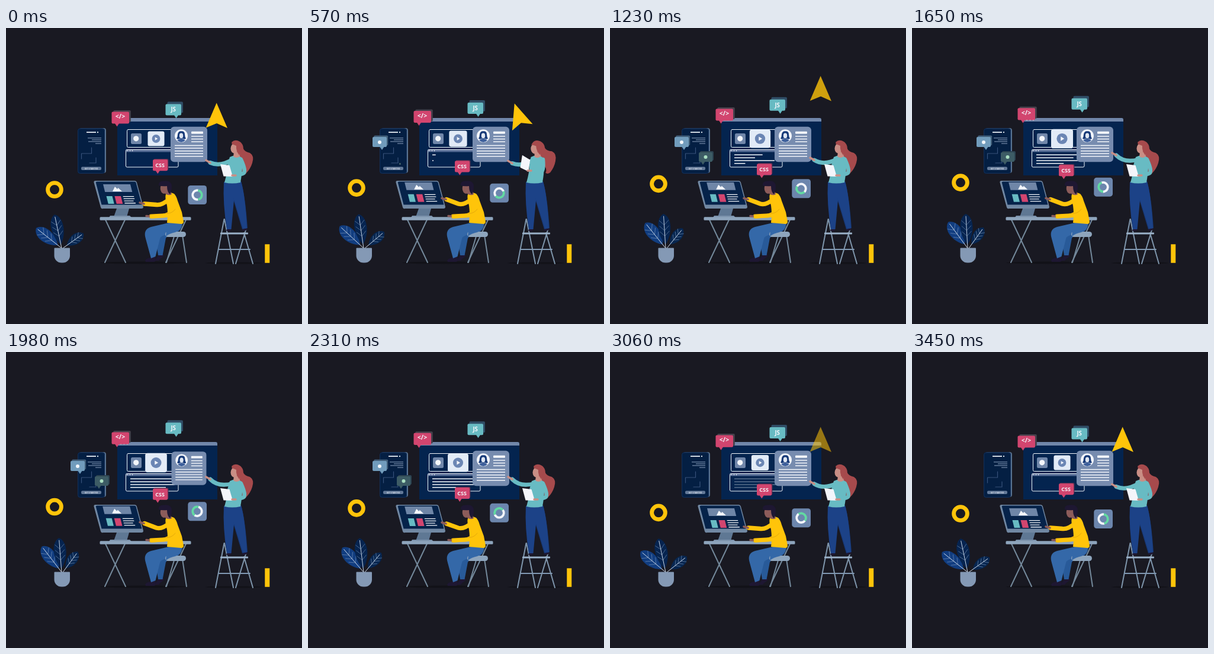
These frames come from a looping animation (500x500 px, 3510 ms). An HTML page with a canvas:

```html
<!DOCTYPE html>
<html lang="en">
<head>
<meta charset="utf-8">
<title>Web team at work</title>
<style>
html, body { margin: 0; width: 100%; height: 100%; overflow: hidden; background: #191922; }
canvas { display: block; width: 500px; height: 500px; }
</style>
</head>
<body>
<canvas id="stage" width="500" height="500"></canvas>
<script>
const ctx = document.getElementById('stage').getContext('2d');
const LOOP = 3510, CYCLE = 3480;
const C = {
  bg: '#191922', navy: '#04244f', slate: '#7187aa', steel: '#8ea5bd', leg: '#74899b',
  white: '#f3f6fb', pink: '#d2456f', teal: '#68bbc3', yellow: '#ffc40a',
  jeans: '#3468a8', pants: '#1c4287', skin: '#c98e85', brown: '#8c5c5a', hair: '#a64a4c', dark: '#1e1732'
};

const mix = (a, b, p) => a + (b - a) * p;
const ramp = (t, a, b) => {
  const p = Math.min(1, Math.max(0, (t - a) / (b - a)));
  return p * p * (3 - 2 * p);
};
const hold = (t, a, b, c, d) => ramp(t, a, b) - ramp(t, c, d);

function fill(d, color) {
  ctx.fillStyle = color;
  ctx.fill(new Path2D(d));
}
function line(d, color, width = 1) {
  ctx.strokeStyle = color;
  ctx.lineWidth = width;
  ctx.stroke(new Path2D(d));
}
function box(x, y, w, h, r, color) {
  ctx.fillStyle = color;
  ctx.beginPath();
  ctx.roundRect(x, y, w, h, r);
  ctx.fill();
}
function frame(x, y, w, h, r, color) {
  ctx.strokeStyle = color;
  ctx.lineWidth = 1;
  ctx.beginPath();
  ctx.roundRect(x, y, w, h, r);
  ctx.stroke();
}
function oval(x, y, rx, ry, color) {
  ctx.fillStyle = color;
  ctx.beginPath();
  ctx.ellipse(x, y, rx, ry, 0, 0, 7);
  ctx.fill();
}
const dot = (x, y, r, color) => oval(x, y, r, r, color);
function arc(x, y, r, from, to, color, width) {
  ctx.strokeStyle = color;
  ctx.lineWidth = width;
  ctx.beginPath();
  ctx.arc(x, y, r, from, to);
  ctx.stroke();
}
function text(s, x, y, size, color, weight = 700) {
  ctx.font = `${weight} ${size}px "Noto Sans", "Open Sans", sans-serif`;
  ctx.textAlign = 'center';
  ctx.textBaseline = 'middle';
  ctx.fillStyle = color;
  ctx.fillText(s, x, y);
}
// Runs draw() in a space moved to x,y with rotation and scale.
function at(x, y, turn, scale, draw) {
  ctx.save();
  ctx.translate(x, y);
  ctx.rotate(turn);
  ctx.scale(scale, scale);
  draw();
  ctx.restore();
}
function fade(alpha, draw) {
  if (alpha <= 0) return;
  ctx.save();
  ctx.globalAlpha = alpha;
  draw();
  ctx.restore();
}

function bubble(x, y, w, h, tail, front, back, dx, dy) {
  box(x + dx, y + dy, w, h, 2, back);
  box(x, y, w, h, 2, front);
  fill(`M${tail - 4} ${y + h - 1}h8l-4 6z`, front);
}

function browser(t, wave) {
  box(188, 152, 169, 97, [3, 3, 0, 0], C.navy);
  box(188, 152, 169, 6, [3, 3, 0, 0], C.slate);
  for (let i = 0; i < 3; i++) dot(194 + i * 5.5, 155, 1.3, C.white);

  frame(204.5, 171.5, 86.5, 30, 2, C.white);
  box(211, 178, 18, 18, 2.5, C.slate);
  dot(219.7, 186.8, 4.6, C.white);

  box(202, 205, 89, 4.5, 1, '#556b94');
  frame(202.5, 205.5, 88.5, 29.5, 2, C.white);
  for (let i = 0; i < 3; i++) dot(205.5 + i * 4, 207.4, 0.8, C.white);
  fade(1 - ramp(t, 2850, 3200), () => {
    const rows = [[480, 0.0636, 75], [700, 0.066, 75], [550, 0.1, 75], [950, 0.066, 60]];
    rows.forEach(([start, speed, max], i) => {
      const w = Math.min(max, Math.max(0, (t - start) * speed));
      if (w) box(210, 213.6 + i * 4.8, w, 1.5, 0, C.white);
    });
  });

  at(253.5, 187, 0, 1 - 0.138 * wave, () => {
    box(-16.3, -14.4, 32.6, 28.8, 3.5, '#e2ebf7');
    dot(0, 0, 8, '#6b86b4');
    fill('M-2 -3.2L3.3 0L-2 3.2z', C.white);
  });
}

function card(t) {
  at(309, 196.7, 0, 1 - 0.05 * hold(t, 1780, 1950, 2010, 2180), () => {
    box(-31, -30, 62, 59.5, 6, '#778caf');
    dot(-13, -14.5, 11, C.white);
    fill('M-21 -10Q-19 -13 -19 -17Q-18 -23 -13 -22.5Q-7 -23 -7 -17Q-7 -13 -5 -10Q-8 -8 -10 -10H-16Q-18 -8 -21 -10z', '#173a78');
    oval(-13, -14.8, 3.2, 4.4, '#dfe6f1');
    fill('M-20 -7Q-13 -13 -6 -7Q-13 -0.5 -20 -7z', '#3d5f9b');
    box(4, -22, 20, 4, 1, C.white);
    for (let i = 0; i < 3; i++) box(4, -14.5 + i * 4.6, 20, 1.5, 0, C.white);
    for (let i = 0; i < 5; i++) box(-24, 1 + i * 4.6, 48, 1.5, 0, C.white);
  });
}

function phone(t) {
  box(124, 169, 45, 76, 4, '#597391');
  box(121, 169.5, 46, 76.5, 4, '#041f43');
  frame(121.5, 170, 45, 75.5, 4, '#15305a');
  box(136, 175.3, 16, 1.7, 0, C.white);
  dot(155, 176.2, 1.1, C.white);
  [[138, 185.3], [145, 188.3], [139, 191.3], [151, 194.6]].forEach(([x, y]) => box(x, y, 161 - x, 1.1, 0, '#8296b4'));
  line('M144.5 202V212H127.5V221M152 219V228H141', '#38527b', 1.2);
  box(127, 234.5, 34, 5.5, 2, '#637998');
  text('GET STARTED', 144, 237.5, 3.5, '#ccd5e2', 600);

  const popA = hold(t, 230, 500, 2330, 2600);
  const popB = hold(t, 480, 880, 2540, 2880);
  const pop = (x, y, scale, draw) => scale > 0 && at(x, y, (scale - 1) * 1.8, scale, draw);
  pop(125, 206, popA, () => {
    bubble(-16, -22, 24, 17, 0, '#719cbc', '#405d78', 2.2, -2.5);
    dot(-4, -13, 3, C.white);
  });
  pop(157, 230, popB, () => {
    bubble(-7, -20, 23, 16, 0, '#3d5c65', '#2c4351', 2, -2);
    dot(4.5, -12, 3, '#a9dec1');
  });
}

function bubbles(wave) {
  const code = 146 + 3.1 * wave, js = 132.9 + 4.8 * wave, css = 236.5 - 4.5 * wave;
  bubble(178.5, code - 7.7, 29.5, 20.2, 187.5, C.pink, '#45404b', 2.8, -2.5);
  text('</>', 193, code + 1, 10.5, C.white);
  bubble(269.5, js - 9.3, 26.5, 19, 287.5, C.teal, '#304d66', 3, -4);
  text('JS', 282.7, js + 1, 9.8, C.white);
  bubble(248, css - 9.8, 25, 19, 256.3, C.pink, '#653252', 1.4, -1.2);
  text('CSS', 260.2, css + 0.7, 9, C.white);
}

function donut(wave, turn) {
  const y = 275.3 + 6.7 * wave;
  box(307.3, y - 16, 31.7, 32, 4.5, '#6c86ad');
  arc(323, y, 7.8, turn + 1.4, turn + 4.9, C.white, 3.8);
  arc(323, y, 7.8, turn - 1.4, turn + 1.4, '#62d9a2', 3.8);
}

function leaf(x, y, degrees, start, length, width, color) {
  at(x, y, degrees * Math.PI / 180, 1, () => {
    const span = length - start, low = -start - span * 0.35;
    fill(`M0 ${-start}C${-width} ${low} ${-width} ${-length + 6} 0 ${-length}` +
      `C${width} ${-length + 6} ${width} ${low} 0 ${-start}z`, color);
    line(`M0 0V${-length + 4}`, '#d5e0ee', 0.9);
    for (let i = 0; i < 3; i++) {
      const v = start + span * (0.28 + i * 0.18), r = width * 0.55;
      line(`M${-r} ${-v - r}L0 ${-v}L${r} ${-v - r}`, '#8fa8c8', 0.5);
    }
  });
}

function plant(phase) {
  const sway = shift => (1 - Math.cos(phase + shift)) / 2;
  leaf(94, 372, mix(-51.7, -36.5, sway(0.1)), 8, 55, 14.5, '#113d80');
  leaf(96, 372, mix(54.5, 35.5, sway(0)), 8, 43, 11.5, '#072650');
  leaf(94, 372, mix(-12.3, -3, sway(0.4)), 6, 58, 14, '#062450');
  box(81.5, 371.5, 26.5, 25, [1, 1, 12, 12], '#8499b5');
}

function desk() {
  oval(233, 396.5, 74, 2, '#121218');
  line('M168 324L202 396M201 324L167 396M304 324L270 396', C.leg, 2);
  line('M284 352L271 396M298 350L305 396', C.leg, 2);
}

function monitor(scroll) {
  fill('M187 305H208L204 319H182z', '#5f7894');
  fill('M176 317H209L212 320H174z', '#7b92ac');
  fill('M151 258H217Q220 258 221 261L232 302Q232 305 229 305H164Q161 306 160 303L148.5 261Q148 258 151 258z', '#7188a3');
  fill('M154 259.5H217Q219 259.5 219.5 261L229.5 298.5H161.5L152 262Q151 259.5 154 259.5z', '#06234a');
  ctx.save();
  ctx.transform(1, 0, 0.25, 1, 164, 264);
  ctx.translate(0, scroll);
  box(0, 0, 46, 13, 0, '#6f86a7');
  fill('M13 12L19 4L22 8L24 6L29 12z', C.white);
  box(0.5, 20, 10, 13, 0, C.teal);
  box(14.5, 20, 10.5, 13, 0, C.pink);
  for (let i = 0; i < 4; i++) box(28.5, 20 + i * 3.7, i === 2 ? 16 : 18.5, 1.3, 0, C.white);
  ctx.restore();
}

function man(reach) {
  // shoes and legs
  fill('M235 393Q236 389 244 388L252 385L253 393Q252 395 248 395H236z', C.dark);
  fill('M253 390L258 383L266 382V386Q260 390 258 393H253z', C.dark);
  fill('M297 330Q298 342 286 346Q274 349 270 355L264.5 384H257L252 352Q259 334 274 330z', '#285a99');
  fill('M275 329L298 330Q294 343 280 346Q266 349 260.5 354L252.5 386L245 389L236 356Q231 340 245 336z', C.jeans);
  box(269, 344, 35, 9, 4.5, C.steel);
  fill('M272 331H298Q296 341 286 345Q276 347 270 352z', C.jeans);
  // far forearm
  line('M283 304Q277 317 264 317L245 318', '#eeb108', 7);
  line('M246 318.5L237 317.5', C.brown, 3.5);
  // torso
  fill('M270 281Q277 276 284 280Q288 284 290 292L297 311L300 327Q300 331 296 331L272 329Q274 314 272 300Q268 286 270 281z', C.yellow);
  line('M286 303Q281 317 268 317L246 318.5', C.yellow, 6.5);
  line('M286 306Q281 313 272 313.5', '#dda20b', 0.8);
  // head
  fill('M268 274H278L280 281Q275 284 269 280z', C.brown);
  oval(267, 271, 6.3, 9, C.brown);
  fill('M258 266Q257 258 267 258.5Q280 257 280 268Q280 276 277 281Q272 277 272 267Q264 268 258 266z', C.dark);
  // reaching arm
  const y = mix(296, 288.5, reach);
  line(`M276 289Q263 300 254 ${mix(298.5, 297, reach)}L234 ${y + 1}`, C.yellow, 7.3);
  line(`M233 ${y + 1}L226 ${y - 1}`, C.brown, 3.6);
}

function ladder() {
  oval(385, 397, 49, 1.6, '#121218');
  line('M368.5 323L354 398M369 323L384 398M406 338L388 398M402 346L417 398', '#7f96ac', 2);
  line('M359 374H412', '#8199b3', 2);
  box(362, 345.5, 47, 3, 1, '#9bb2c9');
}

function woman(nod, lift) {
  const lean = -1.5 * nod;
  // hair behind the body, then legs
  at(389 + nod, 218, -0.12 * nod, 1, () => {
    fill('M-8 -25Q-2 -31 6 -26Q12 -22 12 -14Q14 -9 23 -7Q31 -2 27 10Q24 20 16 28Q11 31 8 28Q13 20 4 12Q-1 3 -1 -6z', C.hair);
  });
  fill('M372 341L380 338V342Q376 345 372 342zM398 341L406 337L408 340Q403 344 399 342z', C.dark);
  fill('M379 260L397 259Q404 282 408 338L399 340Q390 310 382 283z', '#173672');
  fill('M368 260L394 260Q393 276 385 292L380.5 340H373Q366 296 368 260z', C.pants);
  fill('M383 262L397 259Q404 282 407 338L400 339Q392 312 384 287z', C.pants);
  // torso
  fill(`M${378 + lean} 218Q${389 + lean} 212 ${398 + lean} 219Q401 234 396 261Q382 264 369 261Q374 244 374 232z`, C.teal);
  // head
  at(387 + lean, 217 + nod * 0.5, -0.12 * nod, 1, () => {
    fill('M-2 -7L7 -8L8 0Q2 4 -3 0z', C.skin);
    oval(-1.5, -13.5, 6, 8.2, C.skin);
    fill('M-6 -21Q0 -29 9 -24Q15 -18 9 -8L7 -2Q1 -10 2 -18Q-2 -20 -6 -21z', C.hair);
  });
  // pointing arm
  const hand = mix(223.5 + nod, 211, lift);
  line(`M${383 + lean} 222Q${mix(362, 359, lift)} ${mix(235, 229, lift)} 345 ${hand + 4}`, C.teal, 7);
  line(`M345 ${hand + 4}L338 ${hand}`, C.skin, 3.6);
  // paper and the arm that holds it
  at(372.5 - 5.5 * nod, 241 - 12 * nod, 0.42 * nod, 1, () => {
    fill('M-10.5 -11L5 -9L10.5 10L-5 9.5z', '#f4f5fa');
  });
  line(`M397 222Q${mix(407, 399, nod)} 244 ${mix(400, 392, nod)} ${mix(246, 243, nod)}L${mix(390, 379, nod)} ${mix(248.5, 241, nod)}`, C.teal, 6.5);
  line(`M${mix(388, 377, nod)} ${mix(249, 241, nod)}l-6 0`, C.skin, 3.4);
}

function cursor(t) {
  const rise = t < 2000 ? ramp(t, 950, 1350) : 0;
  const alpha = t < 2000 ? 1 - ramp(t, 1180, 1350) : ramp(t, 2900, 3200);
  const turn = -0.32 * hold(t, 150, 540, 600, 950);
  fade(alpha, () => at(355.7, 148.5 - 58 * rise, turn, 1, () => {
    fill('M0 -22L18.3 20.5L0.3 12.5L-18 20z', C.yellow);
  }));
}

function draw(t) {
  const phase = Math.PI * 2 * t / CYCLE, wave = Math.cos(phase);
  const reach = hold(t, 130, 500, 2250, 2620);
  ctx.fillStyle = C.bg;
  ctx.fillRect(0, 0, 500, 500);
  ctx.lineCap = 'round';
  ctx.lineJoin = 'round';
  browser(t, wave);
  card(t);
  phone(t);
  bubbles(wave);
  ctx.lineCap = 'butt';
  donut(wave, phase);
  arc(82, 267 + 6 * wave, 11.4, 0, 7, C.yellow, 6.8);
  ctx.lineCap = 'round';
  box(437.3, 365.3, 8, 31.5, 0, C.yellow);
  plant(phase);
  desk();
  monitor(-3.2 * reach);
  box(158.5, 319.3, 154, 5.5, 1.5, C.steel);
  man(reach);
  ladder();
  woman(hold(t, 180, 530, 620, 1100), hold(t, 1050, 1500, 2800, 3250));
  cursor(t);
}

const begin = performance.now();
function tick() {
  const t = (performance.now() - begin) % LOOP;
  draw(Math.floor(t / 30) * 30 % CYCLE);
  requestAnimationFrame(tick);
}
tick();
</script>
</body>
</html>
```
